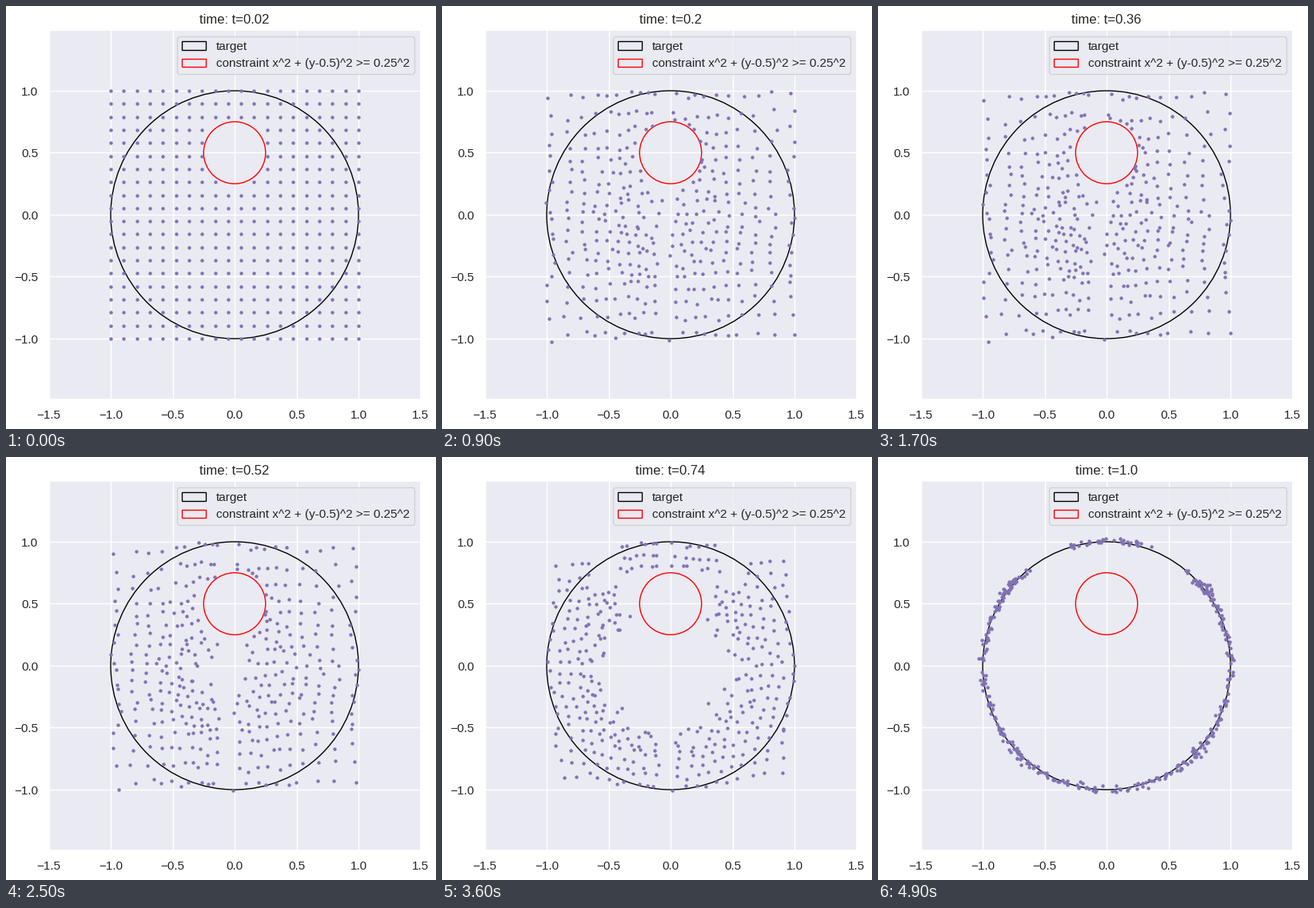
Animation, 538 px wide and 529 px high, one loop 5000 ms. Source, as a matplotlib script:

```python
import numpy as np
import matplotlib.pyplot as plt
from matplotlib.animation import FuncAnimation

FRAMES, INTERVAL = 50, 100
INK, PANEL, DOT = "#262626", "#eaeaf2", "#8172b3"
HOLE, HOLE_R = np.array([0.0, 0.5]), 0.25

plt.rcParams.update({
    "font.family": "Liberation Sans", "font.size": 12,
    "text.color": INK, "xtick.color": INK, "ytick.color": INK,
    "xtick.labelsize": 11, "ytick.labelsize": 11,
    "xtick.major.size": 6, "ytick.major.size": 6,
    "xtick.bottom": False, "ytick.left": False,
    "axes.edgecolor": "white", "axes.linewidth": 1.25,
    "axes.facecolor": PANEL, "axes.axisbelow": True,
    "grid.color": "white", "grid.linewidth": 1,
})

rng = np.random.default_rng(4)
axis = np.linspace(-1, 1, 20)
start = np.array([(x, y) for x in axis for y in axis])
start = start[np.hypot(*(start - HOLE).T) >= HOLE_R]
x0, y0 = start.T
count = len(start)


def pinch(v):
    """Draw the middle of an axis together and leave its ends in place."""
    return 0.7 * v + 0.26 * v * abs(v) ** 3


def gathering():
    """Where the grid gathers, parted along a vertical seam."""
    x = pinch(x0) + np.sign(x0) * 0.06 * (1 - abs(x0)) ** 2
    x += -0.07 * (1 - abs(x0)) + 0.02 * np.sin(7 * y0 + 2 * x0)
    y = pinch(y0) - 0.04 * (1 - abs(y0)) + 0.02 * np.sin(5 * x0 + 3 * y0)
    return np.column_stack([x, y])


def landing():
    """Final places near the unit circle, passing the hole on either side."""
    tilt = np.degrees(np.arctan2(x0, y0))  # clockwise from the top
    above = (y0 > 0.7) & (abs(x0) < 0.6)
    around = tilt + np.sign(tilt) * 25 * np.exp(-(tilt / 40) ** 2)
    tilt = np.where(above, 0.5 * tilt, around) + rng.normal(0, 1.5, count)
    tilt = np.radians(tilt)
    radius = 0.99 + 0.02 * np.hypot(x0, y0) ** 3 + rng.normal(0, 0.012, count)
    return radius[:, None] * np.column_stack([np.sin(tilt), np.cos(tilt)])


gathered, final = gathering(), landing()
wobble = rng.normal(0, 0.017, (count, 2))
power = rng.uniform(1.35, 1.65, count)
clearance = rng.uniform(0.005, 0.05, count)


def positions(t):
    s = (t - 0.02) / 0.98
    gather = 1 - (1 - min(1, s / 0.35)) ** 2
    spread = max(0, (t - 0.4) / 0.6) ** power
    p = start + gather * (gathered - start)
    p += spread[:, None] * (final - p)
    p += wobble * np.sin(np.pi * s ** 0.6)
    # Keep every dot outside the forbidden disc.
    away = p - HOLE
    distance = np.maximum(np.hypot(*away.T), 1e-6)
    limit = HOLE_R + clearance * min(1, s * 3)
    return HOLE + away * np.maximum(1, limit / distance)[:, None]


W, H = 538, 529
AX_W, AX_H = 465, 462
fig = plt.figure(figsize=((W + 1e-6) / 100, (H + 1e-6) / 100), dpi=100,
                 facecolor="white")
ax = fig.add_axes([53.5 / W, 37 / H, AX_W / W, AX_H / H])
half = 1.5 * AX_H / AX_W
ax.set(xlim=(-1.5, 1.5), ylim=(-half, half),
       xticks=np.arange(-1.5, 1.6, 0.5), yticks=np.arange(-1, 1.1, 0.5))
ax.grid(True)

ax.add_patch(plt.Circle((0, 0), 1, fill=False, ec="black", lw=1, label="target"))
ax.add_patch(plt.Circle(HOLE, HOLE_R, fill=False, ec="red", lw=1,
                        label="constraint x^2 + (y-0.5)^2 >= 0.25^2"))
dots = ax.scatter(x0, y0, s=10, color=DOT, linewidths=0, zorder=2)
ax.legend(loc="upper right", fontsize=11, facecolor=PANEL, edgecolor="0.8")
title = ax.set_title("", fontsize=12)


def draw(frame):
    t = round(0.02 * (frame + 1), 2)
    dots.set_offsets(positions(t))
    title.set_text(f"time: t={t}")
    return dots, title


anim = FuncAnimation(fig, draw, frames=FRAMES, interval=INTERVAL,
                     repeat=True, repeat_delay=0)
plt.show()
```
